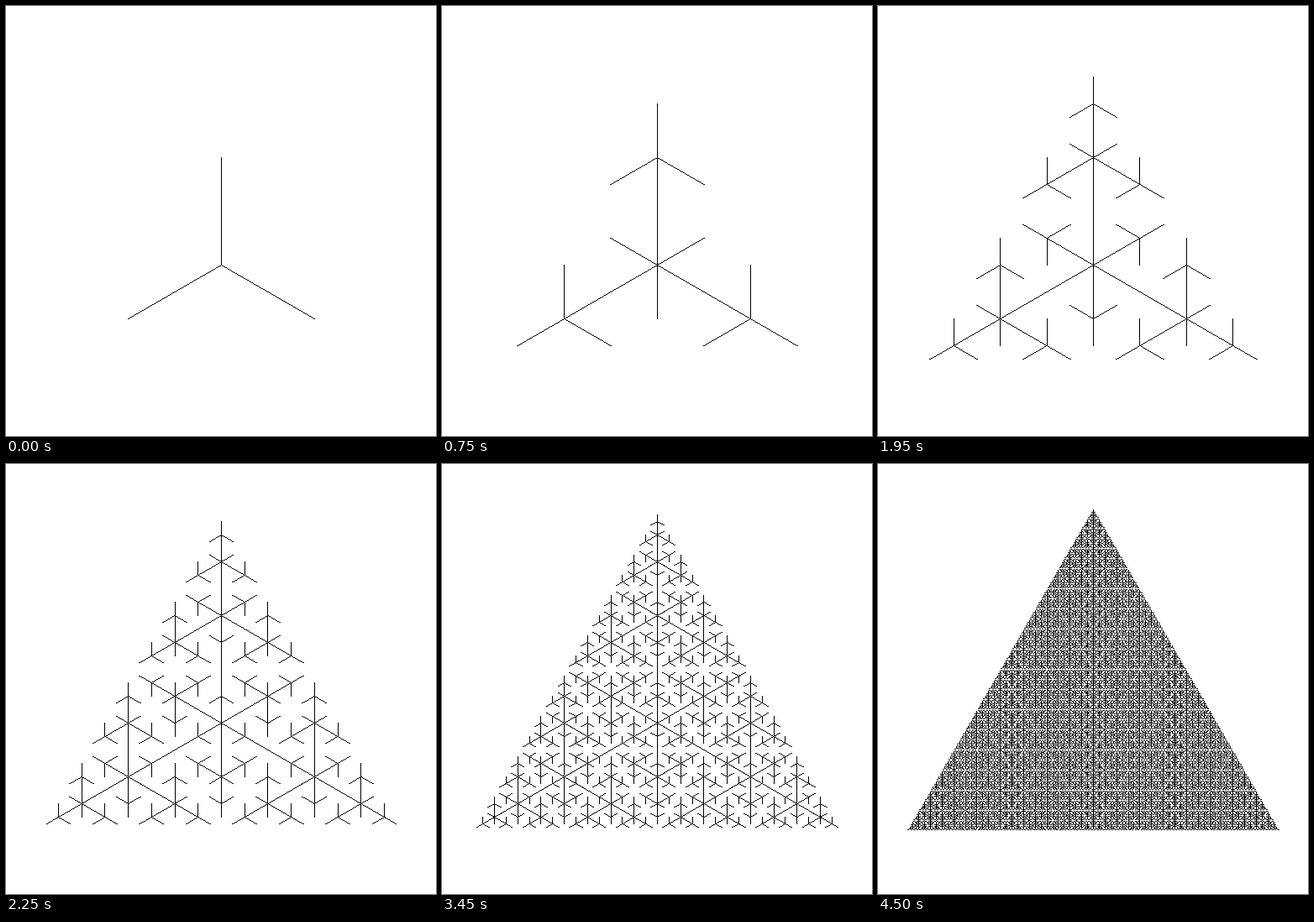
An HTML page with a canvas for the animation above (5.25 s loop, 512 by 512 pixels).

```html
<!DOCTYPE html>
<html lang="en">
<head>
<meta charset="utf-8">
<title>Branching triangle</title>
<style>
  html, body { margin: 0; width: 100%; height: 100%; overflow: hidden; background: #fff; }
  canvas { display: block; width: 512px; height: 512px; image-rendering: pixelated; }
</style>
</head>
<body>
<canvas id="stage" width="512" height="512"></canvas>
<script>
const ctx = document.getElementById('stage').getContext('2d');
const STEP = 750, STEPS = 7;
const COS = Math.sqrt(3) / 2, TAN = 1 / Math.sqrt(3);

// Crisp one-pixel strokes, without antialiasing.
function stem(x, y, len) {
  ctx.fillRect(Math.round(x), Math.min(y, y + len), 1, Math.abs(len) + 1);
}

function arm(x, y, dir, len) {
  const reach = Math.abs(len) * COS;
  const end = dir < 0 ? Math.floor(x - reach - 0.1) : Math.ceil(x + reach + 0.1);
  for (let px = Math.round(x); px !== end + dir; px += dir) {
    const run = Math.min(Math.max((px - x) * dir, 0), reach);
    ctx.fillRect(px, Math.round(y + Math.sign(len) * run * TAN), 1, 1);
  }
}

// A negative length turns the three-armed star upside down.
function star(x, y, len, depth) {
  stem(x, y, -len);
  arm(x, y, -1, len);
  arm(x, y, 1, len);
  if (!depth) return;
  const half = len / 2, dx = len * COS;
  star(x, y - len, half, depth - 1);
  star(x - dx, y + half, half, depth - 1);
  star(x + dx, y + half, half, depth - 1);
  star(x, y, -half, depth - 1);
}

let shown = -1;
function draw(step) {
  if (step === shown) return;
  shown = step;
  ctx.fillStyle = '#fff';
  ctx.fillRect(0, 0, 512, 512);
  ctx.fillStyle = '#000';
  star(256, 308, 128, step);
}

const start = performance.now();
function tick() {
  draw(Math.floor((performance.now() - start) / STEP) % STEPS);
  requestAnimationFrame(tick);
}
tick();
</script>
</body>
</html>
```
